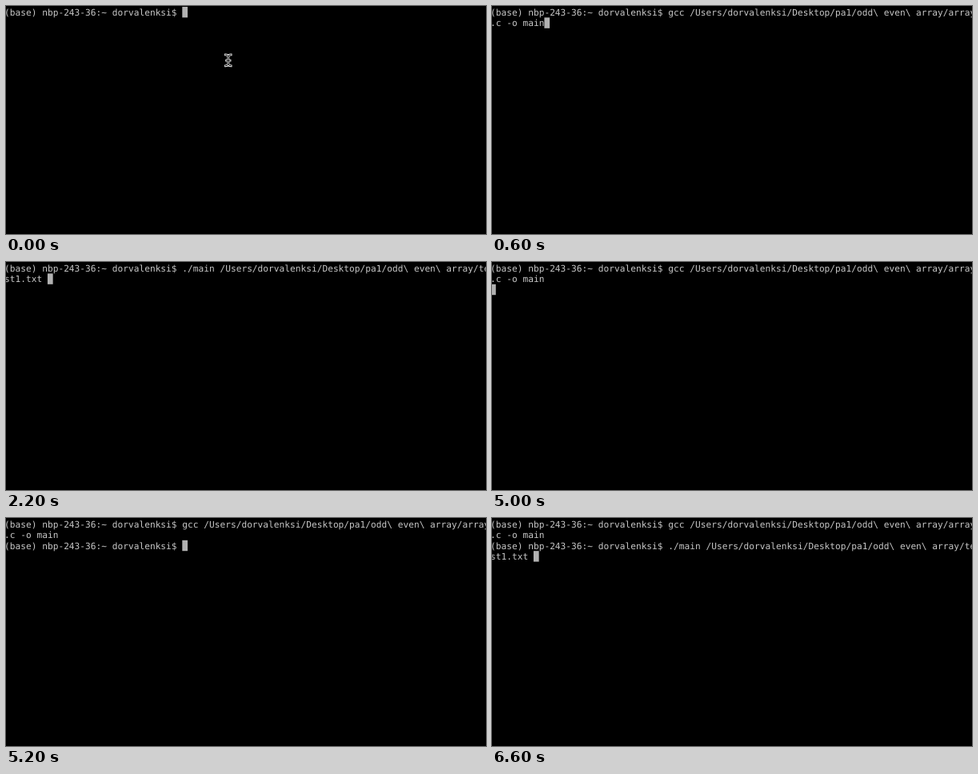
Animation, 600 px wide and 285 px high, one loop 8 s. Source, as an HTML page with a canvas:

```html
<!DOCTYPE html>
<html lang="en">
<head>
<meta charset="utf-8">
<title>Terminal session</title>
<style>
  html, body { margin: 0; width: 100%; height: 100%; overflow: hidden; background: #000; }
  canvas { display: block; }
</style>
</head>
<body>
<canvas id="stage" width="600" height="285"></canvas>
<script>
const ctx = document.getElementById('stage').getContext('2d');
const LOOP = 8000, COLS = 90;
const LEFT = -1.95, TOP = 1, CHAR = 6.735, LINE = 13.4, BASELINE = 10.8;

const user = 'dorvalenksi';
const dir = `/Users/${user}/Desktop/pa1/odd\\ even\\ array/`;
const prompt = `(base) nbp-243-36:~ ${user}$ `;
const compile = `${prompt}gcc ${dir}array.c -o main`;
const run = `${prompt}./main ${dir}test1.txt `;

// [start in ms, terminal lines]; the block cursor follows the last character
const steps = [
  [0, [prompt]],
  [100, [run]],
  [600, [compile]],
  [2200, [run]],
  [3200, [compile]],
  [5000, [compile, '']],
  [5200, [compile, prompt]],
  [6100, [compile, compile]],
  [6600, [compile, run]]
];

const beam = new Path2D(
  'M274.5 60.8Q277.3 60.8 277.8 63Q278.3 60.8 281.1 60.8' +
  'M277.8 63V72.6M275.6 68.2H280' +
  'M274.5 74.8Q277.3 74.8 277.8 72.6Q278.3 74.8 281.1 74.8');

function drawPointer() {
  ctx.lineCap = 'square';
  for (const [color, width] of [['#eee', 2.8], ['#000', 1]]) {
    ctx.strokeStyle = color;
    ctx.lineWidth = width;
    ctx.stroke(beam);
  }
}

function drawTerminal(lines) {
  let row = 0, col = 0;
  ctx.fillStyle = '#c6c6c6';
  lines.forEach((line, i) => {
    if (i) { row++; col = 0; }
    for (const char of line) {
      if (col === COLS) { row++; col = 0; }
      ctx.fillText(char, LEFT + col++ * CHAR, TOP + row * LINE + BASELINE);
    }
  });
  ctx.fillStyle = '#b2b2b2';
  ctx.fillRect(LEFT + col * CHAR, TOP + row * LINE, CHAR, LINE);
}

function draw(now) {
  const time = now % LOOP;
  const step = steps.findLast(([start]) => start <= time);
  ctx.fillStyle = '#000';
  ctx.fillRect(0, 0, 600, 285);
  ctx.font = '11.19px "DejaVu Sans Mono", monospace';
  ctx.textRendering = 'geometricPrecision';
  drawTerminal(step[1]);
  if (step === steps[0]) drawPointer();
}

const begin = performance.now();
function tick() {
  draw(performance.now() - begin);
  requestAnimationFrame(tick);
}
tick();
</script>
</body>
</html>
```
